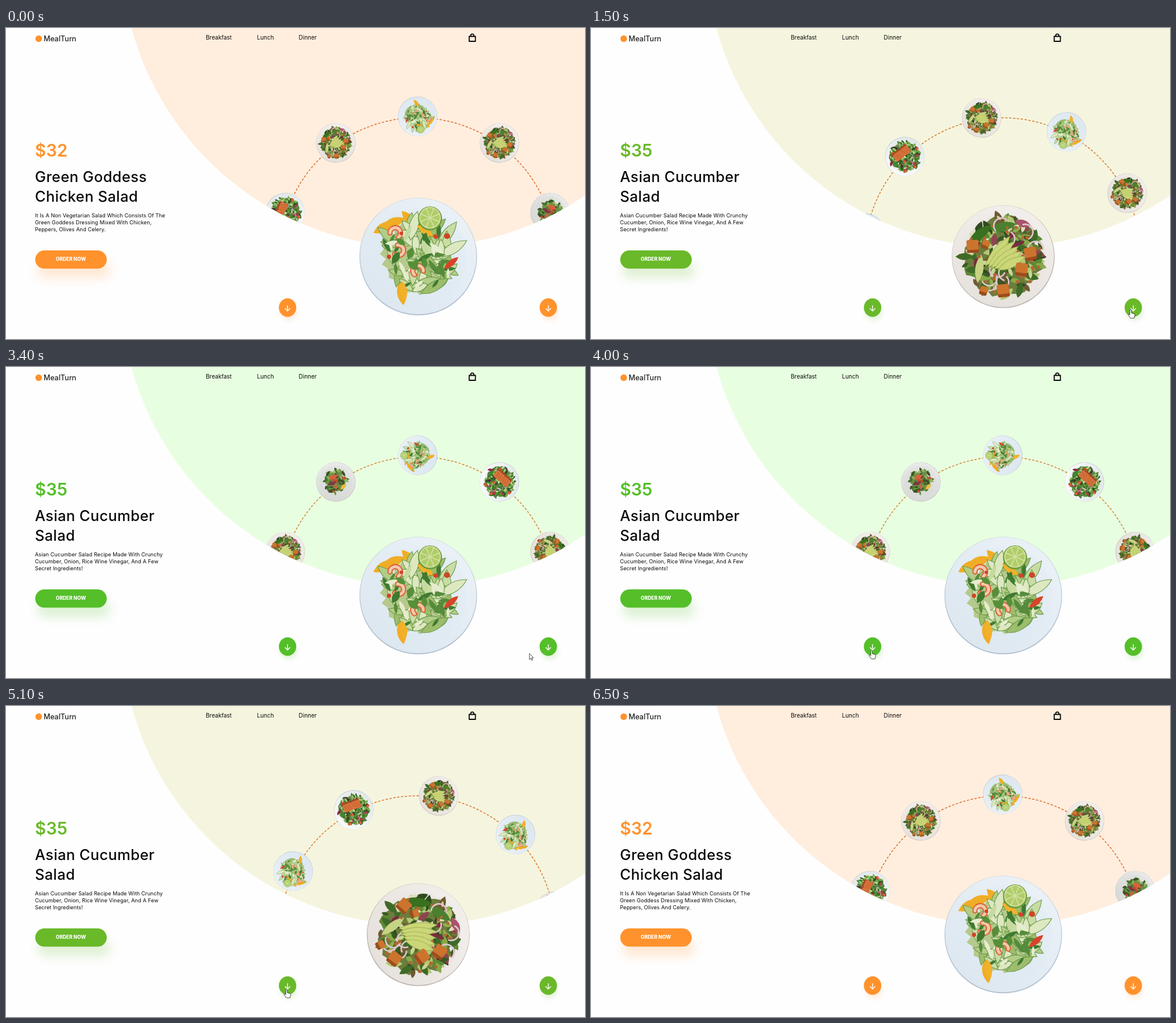
These frames come from a looping animation (1000x537 px, 7 s). An HTML page:

```html
<!DOCTYPE html>
<html lang="en">
<head>
<meta charset="utf-8">
<title>Salad menu</title>
<style>
  html, body { margin: 0; width: 100%; height: 100%; overflow: hidden; background: #fefefe; }
  svg { display: block; width: 100vw; height: 100vh; }
  text { font-family: Inter, Roboto, sans-serif; fill: #0b0b0b; }
  .brand { font-size: 12.5px; font-weight: 500; fill: #222; }
  .nav { font-size: 10px; }
  .price { font-size: 29.5px; font-weight: 600; fill: var(--accent); }
  .title { font-size: 25.4px; font-weight: 500; letter-spacing: .4px; }
  .note { font-size: 9.1px; letter-spacing: .08px; }
  .order { font-size: 8.4px; font-weight: 800; fill: #fff; text-anchor: middle; }
  .accent { fill: var(--accent); }
</style>
</head>
<body>
<svg id="stage" viewBox="0 0 1000 537" preserveAspectRatio="none">
  <defs>
    <clipPath id="inDisc"><circle cx="711" cy="-133.5" r="512"/></clipPath>
    <filter id="soft" x="-40%" y="-80%" width="180%" height="260%"><feGaussianBlur stdDeviation="9"/></filter>
    <filter id="soft2" x="-50%" y="-50%" width="200%" height="200%"><feGaussianBlur stdDeviation="3.5"/></filter>
    <g id="go">
      <ellipse class="accent" cx="2" cy="8" rx="15" ry="15" opacity=".14" filter="url(#soft2)"/>
      <ellipse class="accent" rx="15" ry="16"/>
      <path d="M0-4V6M-4.6 1.4L0 6L4.6 1.4" fill="none" stroke="#fff" stroke-width="1.4"/>
    </g>
  </defs>
  <rect width="1000" height="537" fill="#fefefe"/>
  <circle id="disc" cx="711" cy="-133.5" r="512"/>
  <g clip-path="url(#inDisc)">
    <circle id="track" cx="711" cy="393" r="238" fill="none" stroke-width="1.5" stroke-dasharray="4 2.7"/>
    <g id="wheel"></g>
  </g>
  <use id="plate"/>

  <circle cx="56.5" cy="18.5" r="5.7" fill="#ff922c"/>
  <text class="brand" x="65" y="23">MealTurn</text>
  <text class="nav" x="345" y="20">Breakfast</text>
  <text class="nav" x="433.5" y="20">Lunch</text>
  <text class="nav" x="505.5" y="20">Dinner</text>
  <path d="M800 14.5H810.7V23H800ZM802.6 14.5V13a2.7 2.7 0 0 1 5.4 0V14.5" fill="none" stroke="#080808" stroke-width="1.8"/>

  <text id="price" class="price" x="50" y="222"></text>
  <g id="copy"></g>
  <rect class="accent" x="54" y="404" width="126" height="28" rx="14" opacity=".2" filter="url(#soft)"/>
  <rect class="accent" x="50.5" y="384" width="123.5" height="31.6" rx="15.8"/>
  <text class="order" x="112" y="402">ORDER NOW</text>
  <use href="#go" x="486.3" y="482.7"/>
  <use href="#go" x="936.6" y="482.7"/>
  <g id="cursor" fill="#fff" stroke="#222" stroke-width=".8" stroke-linejoin="round">
    <path id="hand" d="M-1.3 1.2Q0-1 1.3 1.2V6L6 7.4Q7.6 8.2 7.1 10.4L6 15H-.2L-4 9.8Q-4.8 8-3 8.2L-1.3 9.4Z"/>
    <path id="arrow" d="M0 0V10.4L2.4 8.2L4 12L5.6 11.3L4 7.6H7Z"/>
  </g>
</svg>
<script>
const LOOP = 7000, TICK = 100, STEP = 36;
const HUB = { x: 711, y: 393, r: 240.5 };
const $ = id => document.getElementById(id);
const svg = $('stage'), defs = svg.querySelector('defs');

function add(parent, tag, attrs) {
  const el = document.createElementNS('http://www.w3.org/2000/svg', tag);
  for (const key in attrs) el.setAttribute(key, attrs[key]);
  return parent.appendChild(el);
}

const seeded = seed => () => (seed = seed * 16807 % 2147483647) / 2147483647;

// Dishes are drawn around 0,0 on a plate of radius 100
function dish(id, light, shade, edge, seed) {
  const glaze = add(defs, 'linearGradient', { id: 'glaze' + id, x1: .85, y1: .1, x2: .15, y2: .9 });
  add(glaze, 'stop', { offset: .1, 'stop-color': light });
  add(glaze, 'stop', { offset: 1, 'stop-color': shade });
  const g = add(defs, 'g', { id });
  const rand = seeded(seed);
  const pick = list => list[Math.floor(rand() * list.length)];
  add(g, 'circle', { r: 100, fill: edge });
  add(g, 'circle', { cy: -.9, r: 98.9, fill: `url(#glaze${id})` });
  add(g, 'circle', { r: 83, fill: shade, opacity: .35 });
  const put = (tag, x, y, turn, attrs) =>
    add(g, tag, { transform: `translate(${x.toFixed(1)} ${y.toFixed(1)}) rotate(${turn.toFixed(0)})`, ...attrs });
  const leaf = (x, y, turn, long, wide, attrs) =>
    put('path', x, y, turn, { d: `M${-long} 0Q0 ${-wide * 2} ${long} 0Q0 ${wide * 2} ${-long} 0Z`, ...attrs });
  const scatter = (count, spread, draw) => {
    for (let i = 0; i < count; i++) {
      const a = rand() * 2 * Math.PI, r = spread * Math.sqrt(rand());
      draw(r * Math.cos(a), r * Math.sin(a), rand() * 360, rand());
    }
  };
  // Ragged bed under the pieces
  const bed = (radius, fill) => {
    let d = '';
    for (let deg = 0; deg < 360; deg += 8) {
      const a = deg * Math.PI / 180, r = radius * (.86 + rand() * .2);
      d += `${d ? 'L' : 'M'}${(r * Math.cos(a)).toFixed(1)} ${(r * Math.sin(a)).toFixed(1)}`;
    }
    add(g, 'path', { d: d + 'Z', fill });
  };
  const leaves = (count, spread, colors, long, wide, attrs) =>
    scatter(count, spread, (x, y, turn, k) =>
      leaf(x, y, turn, long * (.6 + k * .6), wide * (.7 + k * .5), { fill: pick(colors), ...attrs }));
  const dots = (count, spread, fill, size) =>
    scatter(count, spread, (x, y, turn, k) => put('circle', x, y, 0, { r: size * (.7 + k * .5), fill }));
  const rings = (count, spread, stroke, size) =>
    scatter(count, spread, (x, y, turn) =>
      put('path', x, y, turn, { d: `M${-size} 0A${size} ${size} 0 0 1 ${size} 0`, fill: 'none', stroke, 'stroke-width': 3 }));
  return { put, leaf, bed, leaves, dots, rings };
}

function limeDish() {
  const d = dish('L', '#e9f0f6', '#dde7f0', '#b4c3d2', 17);
  d.bed(64, '#b5c98c');
  [[-58, -50, -28], [-14, -62, 48], [-42, -58, -20], [-28, 62, 82]].forEach(([x, y, turn]) =>
    d.leaf(x, y, turn, 21, 8, { fill: '#f0ad25' }));
  d.leaves(55, 62, ['#c9dca4', '#b3cd86', '#dde8c0', '#9dbd6c'], 23, 7, { stroke: '#6c9a4c', 'stroke-width': 1.1 });
  d.leaves(34, 62, ['#e6ecce', '#568b3c', '#c6daa0', '#3f7a32'], 13, 3.5);
  d.leaf(-25, 58, 80, 17, 6, { fill: '#f2b12a' });
  d.leaf(12, -44, 35, 17, 6, { fill: '#f2b12a' });
  [[-38, -42, 20], [-32, -10, 100], [-1, 22, -30]].forEach(([x, y, turn]) => {
    const bend = { d: 'M-9 5A9 9 0 1 1 7 7', fill: 'none', 'stroke-linecap': 'round' };
    d.put('path', x, y, turn, { ...bend, stroke: '#dc6337', 'stroke-width': 9 });
    d.put('path', x, y, turn, { ...bend, stroke: '#f3c8ac', 'stroke-width': 5 });
  });
  d.leaf(56, 11, -40, 16, 5, { fill: '#d8432a' });
  d.dots(5, 58, '#d3432a', 3.6);
  d.put('circle', 49, -35, 0, { r: 5, fill: '#cf4426' });
  d.leaves(8, 40, ['#3f7a2e', '#568f38'], 10, 5);
  d.put('circle', 20, -65, 0, { r: 20.5, fill: '#6f9e38' });
  d.put('circle', 20, -66, 0, { r: 18.5, fill: '#d3e0a4' });
  for (let a = 0; a < 360; a += 45)
    d.put('path', 20, -66, a, { d: 'M2 0L15.5-5.4Q18 0 15.5 5.4Z', fill: '#b0cd68' });
}

function salmonDish() {
  const d = dish('S', '#f8f9f9', '#e1e7e9', '#bcc5c9', 41);
  d.bed(74, '#56813a');
  d.leaves(120, 75, ['#4f8f30', '#3b7326', '#74ad40', '#2f5122', '#9cc868', '#86a868'], 15, 6);
  d.leaves(14, 70, ['#6d2c42', '#a04858', '#4a3038'], 12, 6);
  d.leaves(70, 74, ['#68a53a', '#427f2b', '#a9cf7a', '#d3dfb8', '#2c4a20'], 9, 3.5);
  d.leaf(58, -13, 55, 19, 9, { fill: '#3f862c' });
  d.leaf(76, -3, -50, 17, 7, { fill: '#8f2a46' });
  d.leaf(-28, -51, 20, 17, 7, { fill: '#a83a50' });
  d.leaf(-58, -22, -10, 14, 6, { fill: '#a44454' });
  d.rings(5, 60, '#dcbcc4', 12);
  [[-25, -68], [29, -68], [12, -24], [-73, 11], [52, 38]].forEach(([x, y]) => {
    d.put('circle', x, y, 0, { r: 8, fill: '#cf4a2c' });
    d.put('circle', x - 2, y - 2, 0, { r: 3.4, fill: '#ea8a60' });
  });
  [[-15, 30, 44], [28, 20, 48]].forEach(([x, y, w]) => {
    d.put('rect', x, y, -14, { x: -w / 2, y: -24, width: w, height: 48, rx: 8, fill: '#a34a22' });
    d.put('rect', x, y - 2, -14, { x: -w / 2, y: -22, width: w, height: 39, rx: 8, fill: '#d8743c' });
    d.put('path', x, y - 2, -14, { d: 'M-14-16L-7 12M-3-17L5 12M8-16L15 10', stroke: '#bf5c2b', 'stroke-width': 3, fill: 'none' });
  });
}

function tofuDish() {
  const d = dish('T', '#f1edea', '#e6e1dc', '#bdb6b0', 73);
  d.bed(76, '#6c7c3c');
  d.leaves(110, 76, ['#5b8a33', '#3f6a27', '#86a94a', '#2f4a20', '#b5c774', '#6f5a34'], 15, 6);
  d.leaves(14, 74, ['#7c2c3e', '#8f4450', '#53302a'], 12, 5);
  d.leaves(50, 76, ['#c9d593', '#3a5a24', '#8fb04c', '#e0dcc0'], 9, 3.5);
  d.leaf(-25, -58, -15, 30, 9, { fill: '#39701f' });
  d.leaf(22, -54, 10, 26, 9, { fill: '#4a8030' });
  d.leaf(60, -45, 40, 17, 7, { fill: '#a8546a' });
  d.leaf(-52, 4, -60, 28, 8, { fill: '#c6d284' });
  d.rings(10, 66, '#dfc6cc', 15);
  d.dots(34, 74, '#b5652f', 3.2);
  for (let i = 0; i < 5; i++)
    d.leaf(-6 + i * 4, -14 + i * 8, -28 + i * 6, 37 - i * 2, 8, { fill: '#cbd678', stroke: '#a5b856', 'stroke-width': 1.2 });
  [[-47, -42, 20], [-22, -36, 50], [51, 14, 12], [24, 36, 30], [-25, 60, 15], [-60, 46, 40]].forEach(([x, y, turn], i) => {
    const s = i % 4 === 1 ? 15 : 23;
    d.put('rect', x, y, turn, { x: -s / 2, y: -s / 2, width: s, height: s + 2, rx: 3, fill: '#9d4c1c' });
    d.put('rect', x, y, turn, { x: -s / 2, y: -s / 2, width: s, height: s - 4, rx: 3, fill: '#cc742e' });
  });
}

function greensDish() {
  const d = dish('G', '#e8e9e8', '#d8d9d7', '#b3b5b4', 97);
  d.bed(52, '#6a8a46');
  d.leaves(46, 60, ['#6a9444', '#47702e', '#8fb35a', '#3a5228'], 17, 7);
  d.leaves(6, 45, ['#7a3a42', '#c8643e'], 14, 7);
  d.leaf(4, -28, 10, 24, 12, { fill: '#d6623c' });
  d.leaf(16, 42, -15, 20, 9, { fill: '#eebc3a' });
  d.dots(5, 50, '#c8472c', 6);
}

limeDish(); salmonDish(); tofuDish(); greensDish();

// Dish, slot counted from the top, own turn
const items = [['T', -5, 60], ['G', -4, 0], ['L', -3, 252], ['S', -2, 200],
               ['T', -1, 10], ['L', 0, 150], ['T', 1, -40], ['G', 2, -60]]
  .map(([kind, slot, turn]) => ({ slot, turn, el: add($('wheel'), 'use', { href: '#' + kind }) }));

const menus = {
  orange: {
    price: '$32', accent: [255, 146, 44], disc: [255, 238, 222], track: [224, 108, 44],
    title: ['Green Goddess', 'Chicken Salad'],
    note: ['It Is A Non Vegetarian Salad Which Consists Of The',
           'Green Goddess Dressing Mixed With Chicken,', 'Peppers, Olives And Celery.']
  },
  green: {
    price: '$35', accent: [84, 191, 41], disc: [232, 254, 225], track: [210, 136, 52],
    title: ['Asian Cucumber', 'Salad'],
    note: ['Asian Cucumber Salad Recipe Made With Crunchy',
           'Cucumber, Onion, Rice Wine Vinegar, And A Few', 'Secret Ingredients!']
  }
};

const clicks = [
  { at: -1000, kind: 'L', dir: 0, menu: 'orange' },
  { at: 1330, kind: 'T', dir: 1, menu: 'green' },
  { at: 2130, kind: 'S', dir: 1, menu: 'orange' },
  { at: 2930, kind: 'L', dir: 1, menu: 'green' },
  { at: 4130, kind: 'S', dir: -1, menu: 'orange' },
  { at: 4930, kind: 'T', dir: -1, menu: 'green' },
  { at: 5830, kind: 'L', dir: -1, menu: 'orange' }
];

const clamp = v => Math.max(0, Math.min(1, v));
const easeOut = v => 1 - (1 - clamp(v)) ** 3;
const smooth = v => (v = clamp(v), v * v * (3 - 2 * v));
const easeInOut = v => (v = clamp(v), v < .5 ? 4 * v ** 3 : 1 - (2 - 2 * v) ** 3 / 2);
const lerp = (a, b, p) => a + (b - a) * p;
const mix = (a, b, p) => `rgb(${a.map((v, i) => Math.round(lerp(v, b[i], p)))})`;

function showCopy(menu) {
  $('price').textContent = menu.price;
  $('copy').replaceChildren();
  const lines = (list, cls, y, gap) => list.forEach((line, i) =>
    add($('copy'), 'text', { class: cls, x: 50, y: y + i * gap }).textContent = line);
  lines(menu.title, 'title', 265.5, 34.2);
  lines(menu.note, 'note', 326.5, 12.3);
}

const moves = [
  { from: 300, to: 1000, a: [868, 550], b: [932, 486], bow: 0 },
  { from: 3200, to: 4000, a: [932, 486], b: [484.5, 489], bow: 12 },
  { from: 5950, to: 6500, a: [484.5, 489], b: [520, 552], bow: 0 }
];

function moveCursor(t) {
  const m = moves.filter(v => t >= v.from).pop() || moves[0];
  const k = clamp((t - m.from) / (m.to - m.from)), p = easeInOut(k);
  const x = lerp(m.a[0], m.b[0], p);
  const y = lerp(m.a[1], m.b[1], p) + m.bow * Math.sin(Math.PI * k);
  const over = [486.3, 936.6].some(cx => Math.hypot(x - cx, y - 482.7) < 16);
  $('cursor').setAttribute('transform', `translate(${x} ${y})`);
  $('hand').style.display = over ? '' : 'none';
  $('arrow').style.display = over ? 'none' : '';
}

let shown = '';

function draw(t) {
  const past = clicks.filter(c => t >= c.at);
  const now = past[past.length - 1], before = past[past.length - 2] || now;
  const age = t - now.at, menu = menus[now.menu], old = menus[before.menu];
  const pop = easeOut(age / 340), tint = smooth(age / 380);

  if (shown !== now.menu) showCopy(menu);
  shown = now.menu;
  svg.style.setProperty('--accent', mix(old.accent, menu.accent, pop));
  $('disc').setAttribute('fill', mix(old.disc, menu.disc, tint));
  $('track').setAttribute('stroke', mix(old.track, menu.track, tint));

  const settled = past.reduce((sum, c) => sum + c.dir, 0) - now.dir;
  const spin = settled + now.dir * easeOut(age / 450);
  for (const { slot, turn, el } of items) {
    const deg = (slot + spin) * STEP, a = deg * Math.PI / 180;
    const x = HUB.x + HUB.r * Math.sin(a), y = HUB.y - HUB.r * Math.cos(a);
    el.setAttribute('transform', `translate(${x} ${y}) rotate(${turn + deg}) scale(.34)`);
  }

  $('plate').setAttribute('href', '#' + now.kind);
  $('plate').setAttribute('transform',
    `translate(712 394.8) rotate(${-180 * now.dir * (1 - pop)}) scale(${1.015 * pop})`);
  moveCursor(t);
}

const start = performance.now();
let last = -1;
function frame() {
  const t = Math.floor((performance.now() - start) % LOOP / TICK) * TICK;
  if (t !== last) draw(last = t);
  requestAnimationFrame(frame);
}
frame();
</script>
</body>
</html>
```
